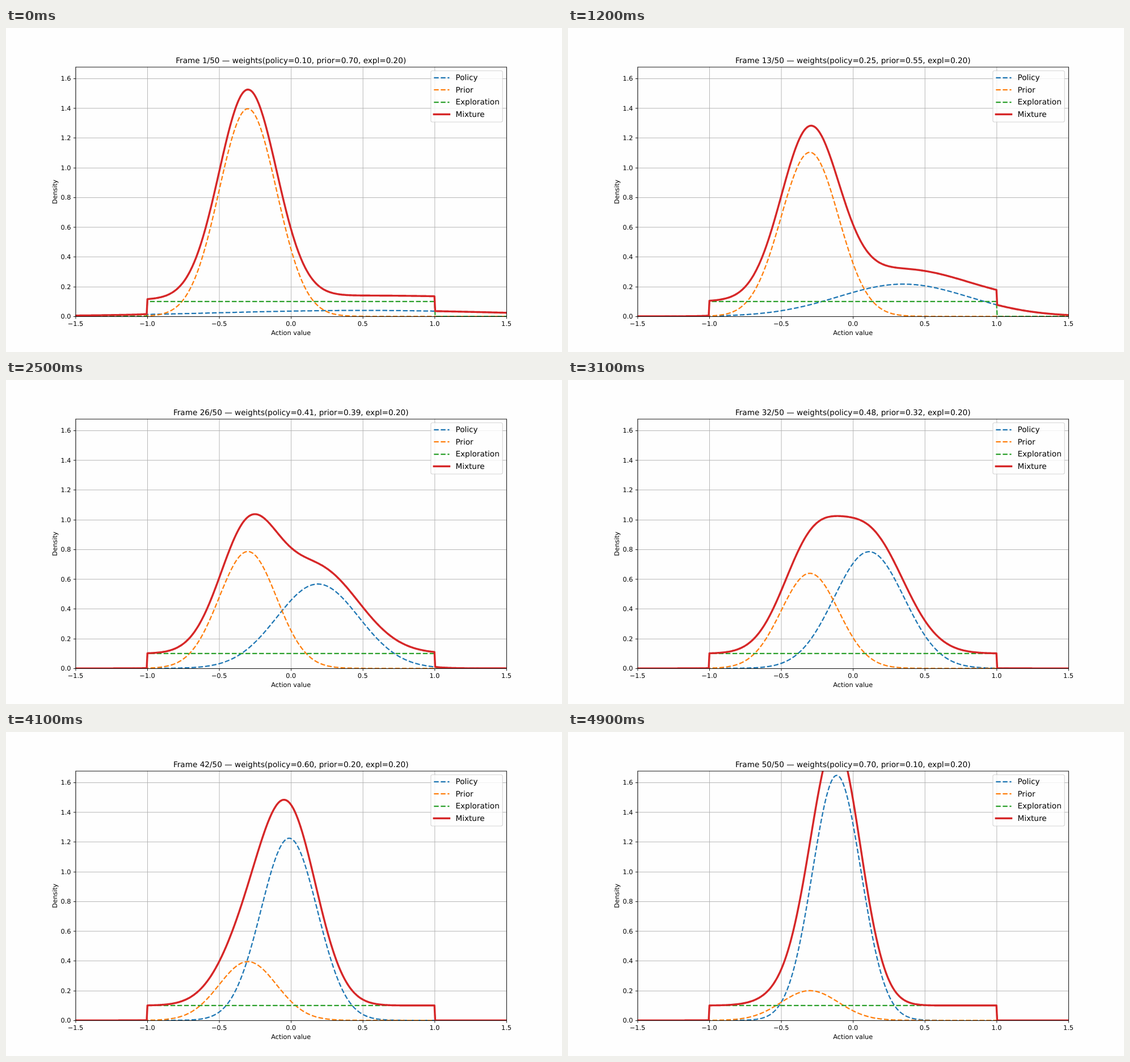
Recreate the animation shown at these times as an HTML page. Size 980 px wide and 572 px high, loop 5000 ms.

```html
<!DOCTYPE html>
<html lang="en">
<head>
<meta charset="utf-8">
<title>Density mixture</title>
<style>
  html, body { margin: 0; width: 100%; height: 100%; overflow: hidden; background: #fefefe; }
  svg { display: block; width: 100vw; height: 100vh; }
  text { font-family: "DejaVu Sans", Verdana, sans-serif; font-size: 13.89px; text-rendering: geometricPrecision; }
  .big { font-size: 16.67px; }
  .mid { text-anchor: middle; }
  .end { text-anchor: end; }
  .curve { fill: none; stroke-linejoin: round; }
</style>
</head>
<body>
<svg id="stage" viewBox="0 0 1200 700" preserveAspectRatio="none">
  <clipPath id="plot"><rect x="150" y="84" width="930" height="539"/></clipPath>
</svg>
<script>
const LEFT = 150, RIGHT = 1080, TOP = 84, BOTTOM = 623;
const PT = 100 / 72;
const STEPS = 50, STEP_MS = 100, SAMPLES = 600;
const Y_MAX = 1.6778;
const stage = document.getElementById('stage');

const px = v => LEFT + (v + 1.5) / 3 * (RIGHT - LEFT);
const py = v => BOTTOM - v / Y_MAX * (BOTTOM - TOP);
const snap = v => Math.floor(v + 0.5) + 0.5;
const label = v => v.toFixed(1).replace('-', '\u2212');
const gauss = (x, mean, sd) =>
  Math.exp(-0.5 * ((x - mean) / sd) ** 2) / (sd * Math.sqrt(2 * Math.PI));

function add(tag, attrs, parent = stage) {
  const el = document.createElementNS('http://www.w3.org/2000/svg', tag);
  for (const key in attrs) el.setAttribute(key, attrs[key]);
  parent.appendChild(el);
  return el;
}

function write(x, y, cls, str, extra = {}) {
  const el = add('text', { x, y, class: cls, ...extra });
  el.textContent = str;
  return el;
}

const stroke = (d, color, pt, extra = {}) =>
  add('path', { d, stroke: color, 'stroke-width': pt * PT, fill: 'none', ...extra });

const series = [
  { name: 'Policy', color: '#1f77b4', dashed: true },
  { name: 'Prior', color: '#ff7f0e', dashed: true },
  { name: 'Exploration', color: '#2ca02c', dashed: true },
  { name: 'Mixture', color: '#d62728', dashed: false }
];
const lineWidth = s => s.dashed ? 2 : 3;
const dash = s => s.dashed
  ? { 'stroke-dasharray': `${3.7 * 2 * PT} ${1.6 * 2 * PT}` }
  : { 'stroke-linecap': 'square' };

// Grid, ticks and tick labels
let grid = '', ticks = '';
for (let i = 0; i <= 6; i++) {
  const v = -1.5 + i * 0.5, x = snap(px(v));
  grid += `M${x} ${TOP}V${BOTTOM}`;
  ticks += `M${x} ${BOTTOM + 0.5}v4.86`;
  write(px(v), 643.6, 'mid', label(v));
}
for (let i = 0; i <= 8; i++) {
  const v = i * 0.2, y = snap(py(v));
  grid += `M${LEFT} ${y}H${RIGHT}`;
  ticks += `M${LEFT + 0.5} ${y}h-4.86`;
  write(140.3, py(v) + 5.3, 'end', label(v));
}
stroke(grid, '#b0b0b0', 0.8);
stroke(ticks, '#000', 0.8);

// Curves
const plot = add('g', { 'clip-path': 'url(#plot)' });
for (const s of series) {
  s.path = add('path', {
    class: 'curve', stroke: s.color, 'stroke-width': lineWidth(s) * PT, ...dash(s)
  }, plot);
}

// Frame and titles
add('rect', {
  x: LEFT + 0.5, y: TOP + 0.5, width: RIGHT - LEFT, height: BOTTOM - TOP,
  fill: 'none', stroke: '#000', 'stroke-width': 0.8 * PT
});
const title = write(615, 75.7, 'big mid', '');
write(615, 663, 'mid', 'Action value');
write(0, 0, 'mid', 'Density', { transform: 'translate(109.6 354) rotate(-90)' });

// Legend
add('rect', {
  x: 917, y: 92.4, width: 154.7, height: 110.8, rx: 3.33,
  fill: '#fff', stroke: '#ccc', 'stroke-width': PT, opacity: 0.8
});
series.forEach((s, i) => {
  const base = 113 + i * 26.4;
  stroke(`M923.6 ${snap(base - 6)}h33.33`, s.color, lineWidth(s), dash(s));
  write(970.3, base, 'big', s.name);
});

function draw(step) {
  const policyW = 0.1 + 0.6 * step / (STEPS - 1);
  const priorW = 0.8 - policyW;
  const mean = 0.5 - 0.0125 * step;
  const sd = 1 / (1 + 0.1 * step);
  const paths = ['', '', '', ''];
  for (let i = 0; i < SAMPLES; i++) {
    const x = -1.5 + 3 * i / (SAMPLES - 1);
    const policy = policyW * gauss(x, mean, sd);
    const prior = priorW * gauss(x, -0.3, 0.2);
    const expl = Math.abs(x) <= 1 ? 0.1 : 0;
    [policy, prior, expl, policy + prior + expl].forEach((v, n) => {
      paths[n] += `${i ? 'L' : 'M'}${px(x).toFixed(2)} ${py(v).toFixed(2)}`;
    });
  }
  series.forEach((s, n) => s.path.setAttribute('d', paths[n]));
  title.textContent = `Frame ${step + 1}/${STEPS} \u2014 weights(policy=${policyW.toFixed(2)}, ` +
    `prior=${priorW.toFixed(2)}, expl=0.20)`;
}

const start = performance.now();
let shown = -1;
function tick() {
  const step = Math.floor((performance.now() - start) / STEP_MS) % STEPS;
  if (step !== shown) draw(shown = step);
  requestAnimationFrame(tick);
}
tick();
</script>
</body>
</html>
```
